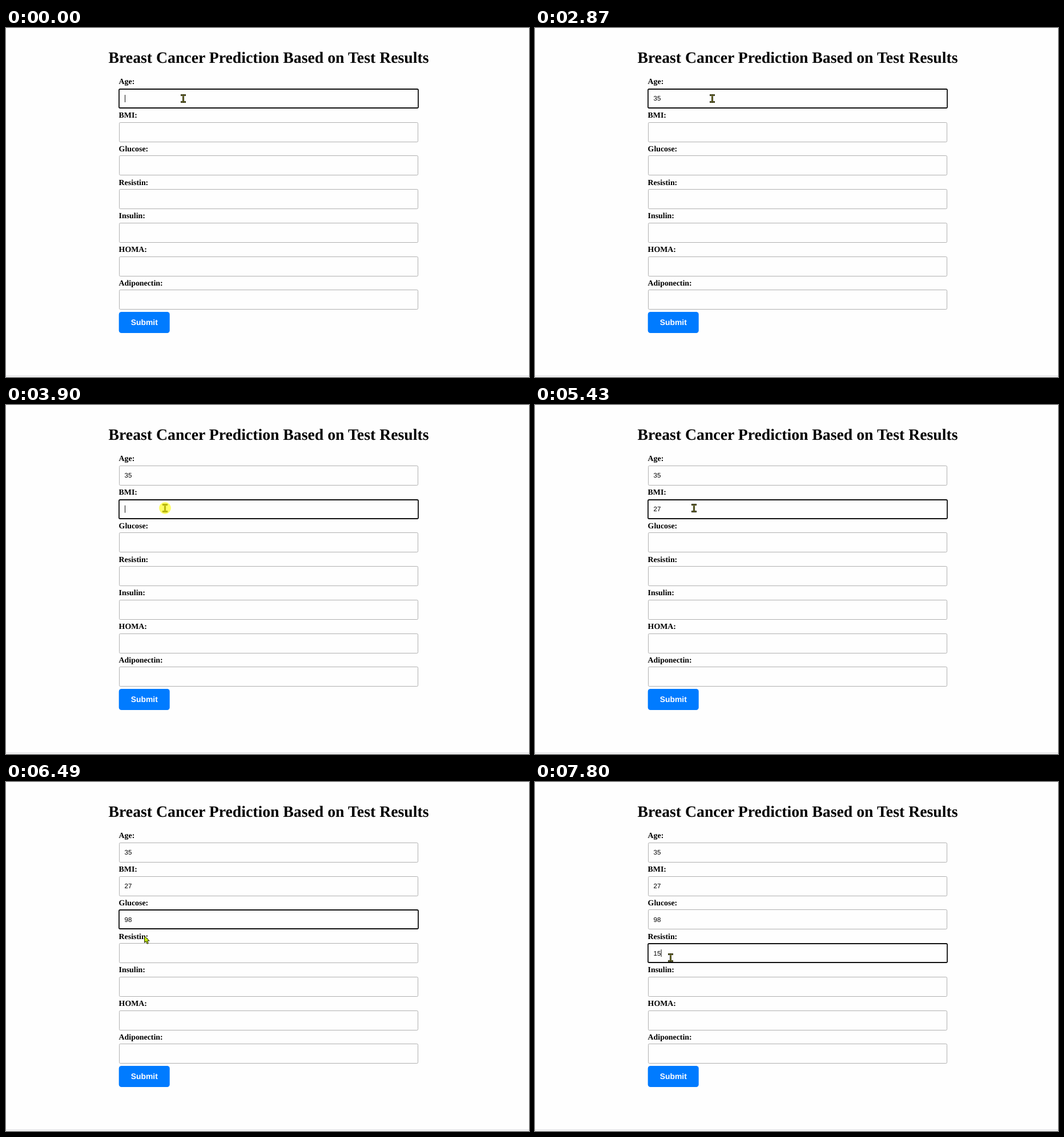
These frames come from a looping animation (916x611 px, 8000 ms). An HTML page:

```html
<!DOCTYPE html>
<html lang="en">
<head>
<meta charset="utf-8">
<title>Prediction form</title>
<style>
  html, body { margin: 0; width: 100%; height: 100%; overflow: hidden; background: #fefefe; }
  svg { display: block; width: 916px; height: 611px; }
  text { text-rendering: geometricPrecision; white-space: pre; }
  .serif { font-family: "Liberation Serif", "Times New Roman", serif; font-weight: bold; }
  .sans { font-family: "Liberation Sans", Arial, sans-serif; }
  .title { font-size: 27.74px; text-anchor: middle; }
  .label { font-size: 13.88px; }
  .value { font-size: 11.56px; }
  .submit { font-size: 13.88px; font-weight: bold; text-anchor: middle; fill: #fff; }
  .box { fill: none; stroke: #b0b0b0; }
  .box.hover { stroke: #8c8c8c; }
  .box.focus { stroke: #101010; stroke-width: 1.8; }
</style>
</head>
<body>
<svg viewBox="0 0 916 611">
  <rect width="916" height="611" fill="#fefefe"/>
  <rect y="608" width="916" height="2" fill="#e9e9eb"/>
  <text class="serif title" x="460" y="61">Breast Cancer Prediction Based on Test Results</text>
  <g id="form"></g>
  <rect x="197.7" y="497" width="89" height="37" rx="4.4" fill="#007bff"/>
  <text class="sans submit" x="242.3" y="520.2">Submit</text>
  <rect id="caret" width="1" height="12.9" fill="#111"/>
  <g id="beam" fill="none">
    <path d="M-4.5-6H-1.2L0-5L1.2-6H4.5M-4.5 6H-1.2L0 5L1.2 6H4.5M0-5V5" stroke="#2b2b17" stroke-width="3"/>
    <path d="M-3.5-6H-1L0-5L1-6H3.5M-3.5 6H-1L0 5L1 6H3.5M0-5V5" stroke="#8d8d2c" stroke-width="1"/>
  </g>
  <path id="arrow" d="M.6.8V12.2L3.2 9.8L5.2 14.3L7.3 13.3L5.4 9.1H9.2Z" fill="#c6f20a" stroke="#1c1c0c" stroke-linejoin="round"/>
  <circle id="disc" r="10.4" fill="#ff0" fill-opacity=".6"/>
</svg>
<script>
const LOOP = 8000, TOP = 106.55, PITCH = 58.7;
const labels = ["Age:", "BMI:", "Glucose:", "Resistin:", "Insulin:", "HOMA:", "Adiponectin:"];
const answers = ["35", "27", "98", "15"];
const caretX = [208, 214, 220.6];
const $ = id => document.getElementById(id);

function add(tag, attrs, text = "") {
  const el = document.createElementNS("http://www.w3.org/2000/svg", tag);
  for (const k in attrs) el.setAttribute(k, attrs[k]);
  el.textContent = text;
  return $("form").appendChild(el);
}

const fields = labels.map((name, i) => {
  const y = TOP + i * PITCH;
  add("text", { class: "serif label", x: 197.6, y: y - 8.1 }, name);
  return {
    y,
    box: add("rect", { rx: 1.8 }),
    value: add("text", { class: "sans value", x: 207.6, y: y + 20.9 })
  };
});

// Each step changes only the listed properties.
const steps = [
  { t: 0, field: 0, typed: 0, caret: 1, x: 310.5, y: 123.5, arrow: 0, disc: 0, hover: 0 },
  { t: 500, caret: 0 },
  { t: 1030, caret: 1 },
  { t: 1550, caret: 0 },
  { t: 2080, typed: 1, caret: 1 },
  { t: 2350, typed: 2 },
  { t: 2870, caret: 0 },
  { t: 3130, arrow: 1, x: 286, y: 163, hover: -1 },
  { t: 3370, arrow: 0, x: 278.5, y: 180.5, caret: 1, hover: 1 },
  { t: 3900, field: 1, typed: 0, disc: 1 },
  { t: 4150, typed: 1, disc: 0 },
  { t: 4670, caret: 0 },
  { t: 4920, typed: 2, caret: 1 },
  { t: 5430, caret: 0 },
  { t: 5700, field: 2, typed: 1, caret: 1, x: 246, y: 245, hover: 2 },
  { t: 5960, typed: 2 },
  { t: 6490, caret: 0, arrow: 1, x: 242, y: 269, hover: -1 },
  { t: 6750, field: 3, typed: 0, caret: 1, arrow: 0, x: 237.5, y: 307.5, disc: 1, hover: 3 },
  { t: 7010, disc: 0 },
  { t: 7270, typed: 1 },
  { t: 7800, typed: 2 }
];

function show(el, on) {
  el.setAttribute("visibility", on ? "visible" : "hidden");
}

function place(el, x, y) {
  el.setAttribute("transform", `translate(${x} ${y})`);
}

function draw(time) {
  const s = Object.assign({}, ...steps.filter(step => step.t <= time));

  fields.forEach((f, i) => {
    const focus = i === s.field, top = Math.floor(f.y);
    const shape = focus
      ? { class: "box focus", x: 198, y: top + 1, width: 524, height: 33 }
      : { class: i === s.hover ? "box hover" : "box", x: 198.5, y: top + .5, width: 523, height: 34 };
    for (const k in shape) f.box.setAttribute(k, shape[k]);
    const count = focus ? s.typed : i < s.field ? 2 : 0;
    f.value.textContent = (answers[i] || "").slice(0, count);
  });

  show($("caret"), s.caret);
  place($("caret"), caretX[s.typed], fields[s.field].y + 10.5);
  show($("beam"), !s.arrow);
  show($("arrow"), s.arrow);
  show($("disc"), s.disc);
  for (const id of ["beam", "arrow", "disc"]) place($(id), s.x, s.y);
}

const start = performance.now();
function tick() {
  draw((performance.now() - start) % LOOP);
  requestAnimationFrame(tick);
}
tick();
</script>
</body>
</html>
```
